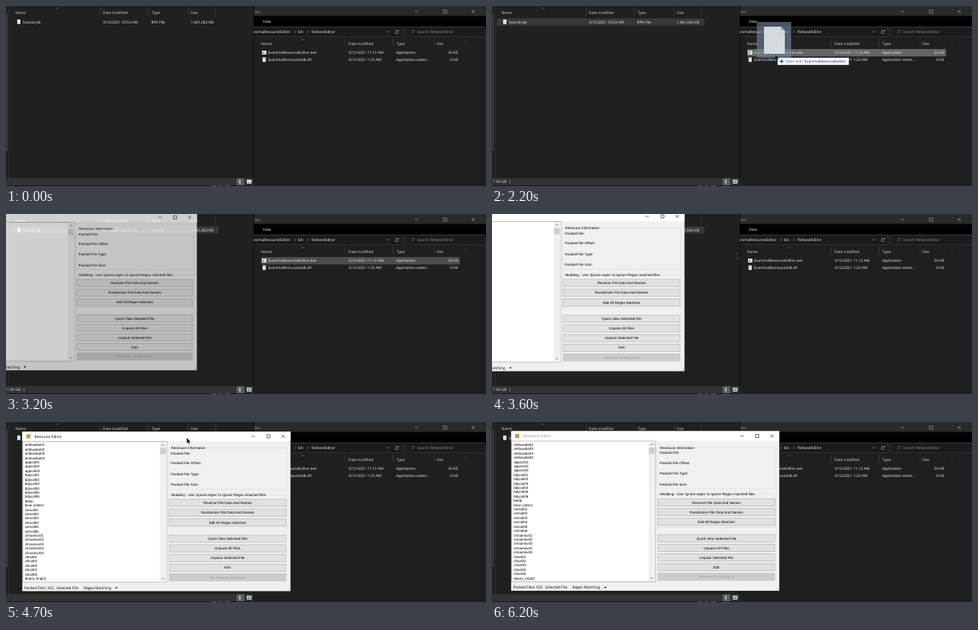
Animation of 600 by 226 pixels, one loop 6.3 s. Source, as an HTML page:

```html
<!DOCTYPE html>
<html lang="en">
<head>
<meta charset="utf-8">
<title>Drag a file onto the editor</title>
<style>
  html, body { margin: 0; width: 100%; height: 100%; overflow: hidden; background: #000; }
  svg { display: block; width: 100%; height: 100%; }
  text { font: 4.7px "Open Sans", "Noto Sans", sans-serif; text-rendering: geometricPrecision; white-space: pre; }
  .form { font: 4.5px "Liberation Sans", Arial, sans-serif; }
</style>
</head>
<body>
<svg id="stage" viewBox="0 0 600 226"></svg>
<script>
const LOOP = 6300, STEP = 100;
const stage = document.getElementById('stage');

function add(parent, tag, attrs, content) {
  const el = document.createElementNS('http://www.w3.org/2000/svg', tag);
  for (const k in attrs) el.setAttribute(k, attrs[k]);
  if (content) el.textContent = content;
  parent.appendChild(el);
  return el;
}
const group = parent => add(parent, 'g', {});
const rect = (g, x, y, width, height, fill, more) => add(g, 'rect', { x, y, width, height, fill, ...more });
const line = (g, d, stroke, w = 0.6) => add(g, 'path', { d, stroke, fill: 'none', 'stroke-width': w });
const label = (g, x, y, s, fill, more) => add(g, 'text', { x, y, fill, ...more }, s);
const show = (el, on) => el.setAttribute('visibility', on ? 'visible' : 'hidden');

function page(g, x, y) {
  rect(g, x, y, 4, 5.6, '#f0f0f0');
  line(g, `M${x + 1} ${y + 2}h2m-2 1.5h2`, '#8a8a8a', 0.4);
}
function columns(g, y, seps, heads) {
  for (const x of seps) line(g, `M${x} ${y - 6}v10`, '#4c4c4c', 0.5);
  for (const [x, s] of heads) label(g, x, y + 1.6, s, '#dedede');
}
function windowButtons(g, xs, y, color) {
  const [a, b, c] = xs;
  line(g, `M${a - 2} ${y}h4M${b - 2} ${y - 2}h4v4h-4zM${c - 2} ${y - 2}l4 4m0-4l-4 4`, color, 0.6);
}

// Right folder window
const right = group(stage);
rect(right, 310, 0, 290, 226, '#201f20');
rect(right, 310, 0, 290, 12.5, '#2a2a2a');
label(right, 310.5, 8.5, 'itor', '#a0a0a0');
windowButtons(right, [513, 549, 584], 7, '#a8a8a8');
rect(right, 310, 12.5, 290, 13, '#000');
label(right, 321, 21, 'View', '#f0f0f0');
rect(right, 290, 26.5, 205, 12, '#1b1b1b', { stroke: '#454545', 'stroke-width': 0.5 });
rect(right, 499, 26.5, 104, 12, '#1b1b1b', { stroke: '#454545', 'stroke-width': 0.5 });
label(right, 355.5, 34, 'ExanimaResourceEditor', '#f0f0f0', { 'text-anchor': 'end' });
label(right, 365, 34, 'bin', '#f0f0f0');
label(right, 382, 34, 'ReleaseEditor', '#f0f0f0');
line(right, 'M360.5 31l1.5 1.5l-1.5 1.5M376.5 31l1.5 1.5l-1.5 1.5M475.5 31.7l1.5 1.5l1.5-1.5', '#c0c0c0', 0.5);
line(right, 'M490 31.2a2 2 0 1 0 .6 1.6M490.6 30v1.5h-1.5', '#c0c0c0', 0.6);
line(right, 'M506.5 34.5l1.7-1.7a1.4 1.4 0 1 1 .4 .3', '#8c8c8c', 0.5);
label(right, 514, 34, 'Search ReleaseEditor', '#8c8c8c');
line(right, 'M369.5 43l1.5-1.3l1.5 1.3', '#999', 0.5);
columns(right, 47, [424, 484, 535, 575], [[319, 'Name'], [428, 'Date modified'], [488, 'Type'], [538, 'Size']]);
const target = rect(right, 319, 54, 248.5, 9.3);
function fileRow(y, name, date, type, size) {
  [[327.5, name], [428, date], [487.5, type]].forEach(([x, s]) => label(right, x, y, s, '#f4f4f4'));
  label(right, 565, y, size, '#e2e2e2', { 'text-anchor': 'end' });
}
rect(right, 320, 56, 5.5, 5, '#e6e6e6');
rect(right, 321, 57.7, 2, 2, '#4b83b8');
page(right, 320.7, 64.6);
fileRow(60.2, 'ExanimaResourceEditor.exe', '3/12/2021 11:12 AM', 'Application', '36 KB');
fileRow(69.2, 'ExanimaResnouceSdk.dll', '3/12/2021 1:23 AM', 'Application exten...', '8 KB');

// Left folder window
const left = group(stage);
rect(left, 0, 0, 309.5, 226, '#202021');
rect(left, 1, 9, 1, 173, '#4a4a4a');
line(left, 'M3.8 0V216', '#373737', 0.7);
line(left, 'M309.7 0V226', '#111', 0.8);
line(left, 'M62.5 3.5l1.5-1.3l1.5 1.3', '#999', 0.5);
columns(left, 8, [118, 178, 228, 262], [[11.7, 'Name'], [121, 'Date modified'], [182, 'Type'], [231, 'Size']]);
const picked = rect(left, 6, 15.5, 259.5, 9);
page(left, 14, 17);
[[21, 'Sound.rpk'], [121, '3/12/2021 10:53 AM'], [181.5, 'RPK File'], [231, '1,461,062 KB']]
  .forEach(([x, s]) => label(left, x, 21.8, s, '#f4f4f4'));
rect(left, 0, 216, 309.5, 9.3, '#333');
rect(left, 0, 225.2, 309.5, 0.8, '#151515');
const status = label(left, 1, 222.4, '1.39 GB   |', '#ececec');
rect(left, 289, 217, 8, 7.5, '#5b5b5b', { stroke: '#8a8a8a', 'stroke-width': 0.5 });
line(left, 'M292.3 218v5', '#fff', 1.1);
const viewIcon = rect(left, 301.5, 218.4, 5, 4.2, '', { stroke: '#f2f2f2', 'stroke-width': 0.7 });
line(left, 'M302.3 221.4h3.4', '#555', 0.6);
line(left, 'M258 225.6h5m3 0h4m4 0h6', '#8d8d8d', 0.5);

// Editor window, laid out where its drag nearly ends
const editor = group(stage);
rect(editor, 20.4, 12, 335.2, 200.4, '#f0f0f0');
rect(editor, 20.4, 12, 335.2, 12.2, '#fff');
rect(editor, 25.5, 15.5, 5, 5, '#c39a4e');
const title = label(editor, 35.5, 19.8, 'Resrouce Editor', '#000');
windowButtons(editor, [309, 328, 346.5], 18, '#111');
rect(editor, 21, 24.5, 180, 176.5, '#fff', { stroke: '#828790', 'stroke-width': 0.5 });
rect(editor, 192.2, 25, 8.5, 175.5, '#f0f0f0');
rect(editor, 192.7, 32.5, 7, 8, '#cdcdcd');
line(editor, 'M194.8 29.5l1.6-1.6l1.6 1.6M194.8 195.8l1.6 1.6l1.6-1.6', '#555', 0.7);

const form = { class: 'form' };
const series = (name, n) => Array.from({ length: n }, (_, i) => name + '0' + (i + 1));
[...series('ambuwba', 4), ...series('appcol', 3), ...series('bdycol', 6), 'beep', 'bme critters',
  ...series('cercol', 6), ...series('chnamov', 5), ...series('cltcol', 5), 'doora_hng01']
  .forEach((s, i) => label(editor, 23.8, 30.4 + i * 5.41, s, '#000', form));

function groupBox(y, h, s, w) {
  rect(editor, 203, y, 148, h, 'none', { stroke: '#d9d9d9', 'stroke-width': 0.6 });
  rect(editor, 205.5, y - 2, w, 4, '#f0f0f0');
  label(editor, 206.5, y + 1.6, s, '#000', form);
}
groupBox(32.5, 52, 'Resrouce Information', 44);
groupBox(91.3, 41.5, "Modding - Use 'Ignore.regex' to Ignore Regex matched files", 122);
['File:', 'File Offset:', 'File Type:', 'File Size:']
  .forEach((s, i) => label(editor, 206, 40.8 + [0, 12.5, 26, 39.5][i], 'Packed ' + s, '#000', form));

function button(y, s, off) {
  rect(editor, 204, y - 4.5, 146, 9, off ? '#cccccc' : '#e1e1e1', { stroke: off ? '#bfbfbf' : '#adadad', 'stroke-width': 0.6 });
  label(editor, 277, y + 1.6, s, off ? '#999' : '#000', { ...form, 'text-anchor': 'middle' });
}
['Reverse File Data And Names', 'Randomize File Data And Names', 'Edit All Regex Matches']
  .forEach((s, i) => button(101.5 + i * 12.2, s));
['Quick View Selected File', 'Unpack All Files', 'Unpack Selected File', 'Edit', 'Re-Pack To Resource']
  .forEach((s, i) => button(146.5 + i * 12.1, s, i === 4));
[[23, 'Packed Files: 932'], [63, 'Selected File:'], [97, 'Regex Matching']]
  .forEach(([x, s]) => label(editor, x, 209.8, s, '#000'));
add(editor, 'path', { d: 'M136.3 207.5h3.4l-1.7 1.8z', fill: '#111' });
line(editor, 'M353.5 211h1m-3 0h1m1-2h1', '#aaa', 0.8);

// Drag image, drop hint and pointer share the pointer's tip as their zero point
const pointer = group(stage), drag = group(pointer), hint = group(pointer);
rect(drag, -23, -41, 43, 45, '#71879c', { opacity: 0.62 });
add(drag, 'path', { d: 'M-14-35H7l5 5V-1H-14z', fill: '#dfe3e6', opacity: 0.93 });
add(drag, 'path', { d: 'M7-35v5h5z', fill: '#aab2ba' });
rect(hint, 3, 4, 89, 9, '#fff', { stroke: '#8a8a8a', 'stroke-width': 0.4 });
line(hint, 'M5.5 8.5h5m-2.5-2.5v5', '#1d62b5', 1.4);
label(hint, 12.5, 10.2, 'Open with', '#2257a8');
label(hint, 36.4, 10.2, 'ExanimaResourceEditor', '#0d1c4a');
add(pointer, 'path', {
  d: 'M0 0v6.6l1.6-1.4l1.1 2.5l1.1-.5l-1.1-2.4h2z', fill: '#0c0c0c', stroke: '#9a9a9a', 'stroke-width': 0.3
});

// Each path is a list of [time, ...values], joined by straight lines
function at(keys, t) {
  let i = 0;
  while (i < keys.length - 2 && t >= keys[i + 1][0]) i++;
  const [a, b] = [keys[i], keys[i + 1]];
  const k = Math.min(1, Math.max(0, (t - a[0]) / (b[0] - a[0])));
  return a.slice(1).map((v, j) => v + (b[j + 1] - v) * k);
}
const pointerPath = [
  [100, 262, 232], [500, 145, 92], [800, 66, 38], [1100, 40, 20], [1300, 42, 20], [1500, 54, 21],
  [1700, 145, 37], [1900, 255, 49], [2200, 354, 61], [2600, 356, 61], [3500, 356, 61],
  [3800, 205, 26], [4100, 113, 7], [4200, 113, 7], [4300, 142, 16], [4700, 226, 20],
  [4900, 230, 19], [5000, 230, 19], [5300, 240, 105], [5600, 262, 232]
];
const editorPath = [[4200, -115, -15], [4300, -89, -6.5], [4500, -40, -2], [4700, 0, 0], [4900, 3.5, -0.5]];
const opening = [[2950, 0, 0.94], [3200, 0.79, 0.988], [3400, 1, 1]];

function frame(now) {
  const t = Math.floor(now % LOOP / STEP) * STEP;
  const during = (a, b) => t >= a && t < b;
  const [px, py] = at(pointerPath, t), [ex, ey] = at(editorPath, t), [alpha, size] = at(opening, t);
  pointer.setAttribute('transform', `translate(${px} ${py})`);
  editor.setAttribute('transform', `translate(${ex + 188} ${ey + 112.5}) scale(${size}) translate(-188 -112.5)`);
  editor.setAttribute('opacity', alpha);
  show(editor, t >= 3000);
  show(drag, during(1400, 2700));
  show(hint, during(2100, 2700));
  show(target, during(2100, 3600));
  target.setAttribute('fill', t < 2700 ? '#646464' : '#4d4d4d');
  show(picked, during(1000, 4400));
  picked.setAttribute('fill', t < 1300 ? '#2c2c2c' : '#383838');
  show(status, during(1300, 4400));
  viewIcon.setAttribute('fill', t < 1300 ? '#e4e4e4' : '#7fa9d2');
  title.setAttribute('fill', t < 6100 ? '#000' : '#8c8c8c');
  requestAnimationFrame(frame);
}
requestAnimationFrame(frame);
</script>
</body>
</html>
```
